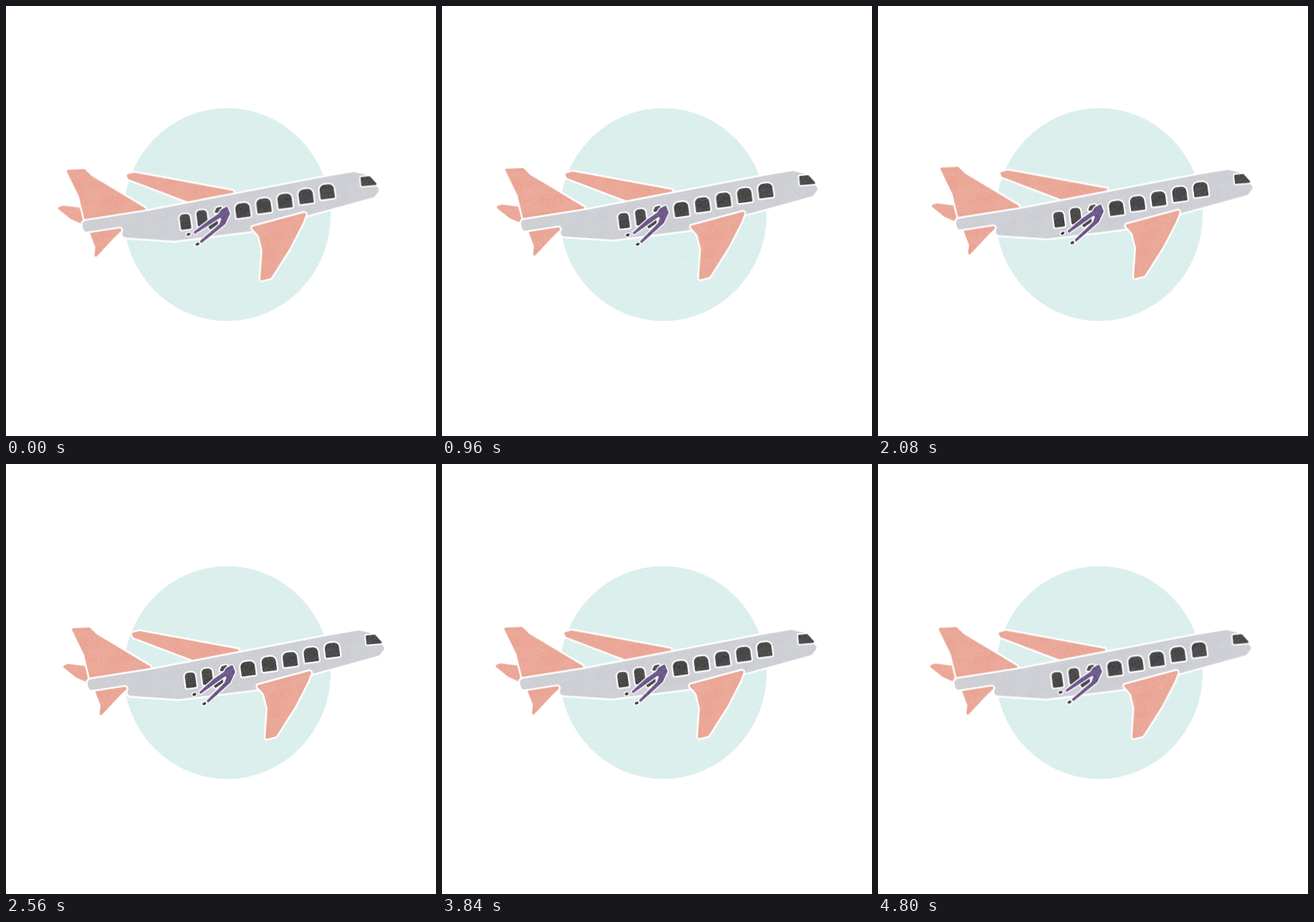
An HTML page with a canvas for the animation above (4880 ms loop, 600 px wide and 600 px high).

```html
<!DOCTYPE html>
<html lang="en">
<head>
<meta charset="utf-8">
<title>Plane</title>
<style>
html, body { margin: 0; width: 100%; height: 100%; overflow: hidden; background: #fff; }
canvas { display: block; }
</style>
</head>
<body>
<canvas id="stage" width="600" height="600"></canvas>
<script>
const SIZE = 600, STEP = 80, LOOP = 4880, CYCLE = 60;
const TAU = Math.PI * 2;
const COLOR = {
  sky: '#dbefed', coral: '#eba898', body: '#ced0d5',
  glass: '#4a4a4b', trousers: '#6c5889', shoe: '#37333f'
};
const ctx = document.getElementById('stage').getContext('2d');

function makeLayer() {
  const canvas = document.createElement('canvas');
  canvas.width = canvas.height = SIZE;
  return canvas.getContext('2d', { willReadFrequently: true });
}

let seed = 7;
function random() {
  seed = (seed * 1664525 + 1013904223) >>> 0;
  return seed / 4294967296;
}

// Pencil grain: fine speckle plus broad, slanted shading.
const grain = new Float32Array(SIZE * SIZE);
for (let y = 0, i = 0; y < SIZE; y++) {
  for (let x = 0; x < SIZE; x++, i++) {
    const speck = random() + random() - 1;
    const broad = Math.sin(x * 0.09 + y * 0.16 + 2 * Math.sin(x * 0.03)) *
                  Math.sin(y * 0.11 - x * 0.04);
    grain[i] = speck * 0.13 + broad * 0.03;
  }
}

function shade(layer) {
  const image = layer.getImageData(0, 0, SIZE, SIZE);
  const px = image.data;
  for (let i = 0, p = 0; p < px.length; i++, p += 4) {
    if (!px[p + 3]) continue;
    for (let c = p; c < p + 3; c++) px[c] = 255 - (255 - px[c]) * (1 + grain[i]);
  }
  layer.putImageData(image, 0, 0);
}

function outlined(g, color, border) {
  g.lineJoin = g.lineCap = 'round';
  g.strokeStyle = '#fff';
  g.lineWidth = border * 2;
  g.stroke();
  g.fillStyle = color;
  g.fill();
}

function shape(g, color, points, radius = 2, border = 2.5) {
  const n = points.length, [a, b] = [points[n - 1], points[0]];
  g.beginPath();
  g.moveTo((a[0] + b[0]) / 2, (a[1] + b[1]) / 2);
  points.forEach((p, i) => g.arcTo(...p, ...points[(i + 1) % n], radius));
  g.closePath();
  outlined(g, color, border);
}

function pane(g, x, y, w, h) {
  g.save();
  g.translate(x, y);
  g.rotate(-0.13);
  g.beginPath();
  g.roundRect(-w / 2, -h / 2, w, h, [w * 0.35, w * 0.35, 1.5, 1.5]);
  outlined(g, COLOR.glass, 2.2);
  g.restore();
}

function drawTail(g) {
  shape(g, COLOR.coral, [[71, 281], [80, 278], [104, 281], [114, 299], [105, 303], [91, 297]]);
  shape(g, COLOR.coral, [[84, 228], [110, 227], [119, 236], [199, 284], [110, 298], [102, 265]]);
  shape(g, COLOR.coral, [[117, 315], [169, 306], [152, 322], [123, 353], [125, 336]]);
}

function drawHull(g) {
  drawTail(g);
  shape(g, COLOR.coral, [[168, 235], [179, 232], [326, 259], [258, 274], [171, 241]]);
  shape(g, COLOR.body, [
    [106, 300], [195, 286], [445, 238], [486, 231], [503, 235], [522, 256],
    [514, 266], [340, 314], [235, 327], [160, 322], [167, 306], [109, 315]
  ], 5);
  shape(g, COLOR.coral, [
    [342, 308], [420, 287], [414, 303], [396, 338],
    [370, 379], [355, 383], [358, 340], [353, 320]
  ]);
  pane(g, 250.5, 300.5, 14.5, 21);
  pane(g, 274, 295.5, 14.5, 22);
  for (let i = 0; i < 5; i++) pane(g, 330.6 + 29.4 * i, 284.5 - 6.5 * i, 20, 20);
  shape(g, COLOR.glass, [[495, 238], [508, 237], [519, 249], [496, 251]], 1.5, 2);
}

function shoe(g, x, y) {
  g.beginPath();
  g.ellipse(x, y, 2.8, 1.9, -0.35, 0, TAU);
  outlined(g, COLOR.shoe, 1.5);
}

function drawLegs(g, kick) {
  const ax = 255 + kick, ay = 318 + 2.6 * kick;
  const bx = 267.5 + 2.5 * kick, by = 331.7 + 1.8 * kick;
  shape(g, COLOR.glass, [[291, 288], [294, 281], [302, 279], [299, 288]], 1, 2);
  shape(g, COLOR.glass, [[281, 304], [296, 297], [296, 304], [285, 312]], 2, 2);
  shoe(g, ax, ay);
  shoe(g, bx, by);
  shape(g, COLOR.trousers, [
    [300, 284], [309, 279], [313, 289], [306, 304],
    [bx + 5, by - 1], [bx + 3, by - 4], [298, 304], [302, 293],
    [ax + 8, ay], [ax + 7, ay - 3.5], [284, 298], [297, 289]
  ], 1.5, 1.5);
}

// Hand-held drift: waves as [amplitude, cycles per loop, step of the peak].
const swayX = [[-1, 1, 0], [1.5, 3, 11], [0.7, 4, 13], [2, 5, 8]];
const swayY = [[1.7, 1, 53], [1.2, 2, 53], [2.2, 5, 9], [1.3, 9, 4.7]];

function sway(waves, base, step) {
  return waves.reduce((sum, [amp, cycles, peak]) =>
    sum + amp * Math.cos(TAU * cycles * (step - peak) / CYCLE), base);
}

const sky = makeLayer(), hull = makeLayer(), plane = makeLayer();
sky.fillStyle = COLOR.sky;
sky.beginPath();
sky.ellipse(308.5, 291, 144.5, 148.5, 0, 0, TAU);
sky.fill();
shade(sky);
drawHull(hull);

let shown = -1;
function draw(now) {
  const step = Math.floor((now % LOOP) / STEP);
  if (step !== shown) {
    shown = step;
    plane.clearRect(0, 0, SIZE, SIZE);
    plane.drawImage(hull.canvas, 0, 0);
    drawLegs(plane, (1 - Math.cos(3 * TAU * step / CYCLE)) / 2);
    shade(plane);
    ctx.fillStyle = '#fff';
    ctx.fillRect(0, 0, SIZE, SIZE);
    ctx.drawImage(sky.canvas, 0, 0);
    ctx.drawImage(plane.canvas, sway(swayX, 2.6, step), sway(swayY, -0.5, step));
  }
  requestAnimationFrame(draw);
}
draw(0);
</script>
</body>
</html>
```
